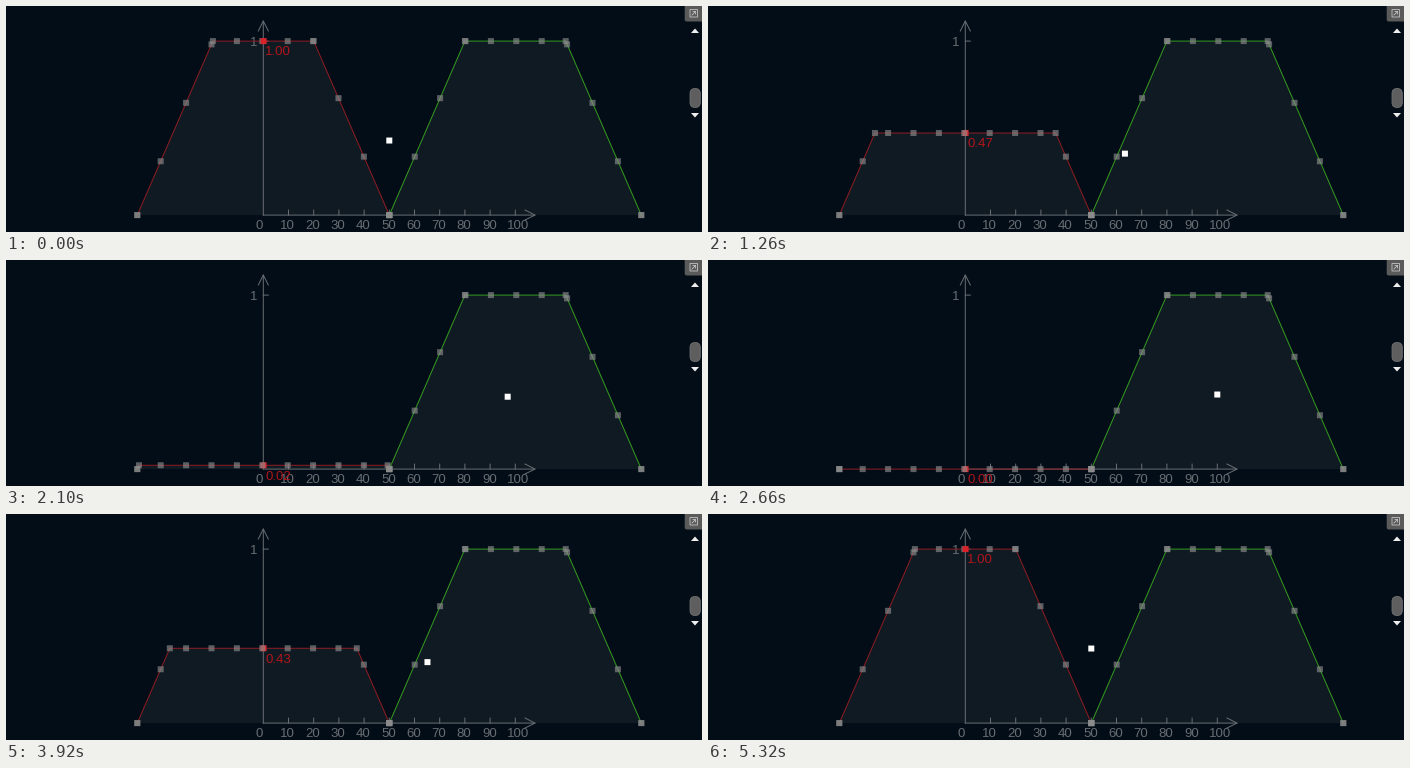
A matplotlib script that plays this animation: 696x226 px, repeating every 5.39 s.

```python
import numpy as np
import matplotlib.pyplot as plt
from matplotlib.animation import FuncAnimation
from matplotlib.collections import PolyCollection
from matplotlib.patches import FancyBboxPatch, Polygon, Rectangle

W, H, DPI = 696, 226, 64
FRAMES, STEP_MS = 77, 70
X0, Y0, UNIT, TALL = 257.3, 209.1, 2.52, 174
BG, FILL, GRAY = "#020d17", "#101a23", "#686d72"
RED, GREEN = "#8f1c22", "#349a20"
FONT = "Liberation Sans"
PT = 72 / DPI

plt.rcParams["toolbar"] = "None"
fig = plt.figure(figsize=(W / DPI, H / DPI), dpi=DPI, facecolor=BG)
ax = fig.add_axes([0, 0, 1, 1])
ax.set_xlim(0, W)
ax.set_ylim(H, 0)
ax.axis("off")


def px(u):
    return X0 + UNIT * np.asarray(u)


def py(v):
    return Y0 - TALL * np.asarray(v)


def line(xs, ys, color=GRAY, z=3, width=1):
    return ax.plot(xs, ys, color=color, lw=width * PT, zorder=z,
                   solid_joinstyle="miter", snap=False)[0]


def label(x, y, s, color=GRAY, z=4, ha="center"):
    return ax.text(x, y, s, color=color, family=FONT, size=13.2 * PT,
                   ha=ha, va="center_baseline", zorder=z)


def squares(color, z, alpha=1.0):
    return ax.add_collection(PolyCollection(
        [], facecolors=color, linewidths=0, alpha=alpha, zorder=z,
        snap=False), autolim=False)


def place(boxes, xs, ys, r=3):
    corners = r * np.array([(-1, -1), (1, -1), (1, 1), (-1, 1)])
    boxes.set_verts([corners + p for p in zip(xs, ys)])


def trapezoid(mid, v):
    """Corners of a fuzzy set around mid, clipped at height v."""
    half = 50 - 30 * v
    return (np.array([mid - 50, mid - half, mid + half, mid + 50]),
            np.array([0, v, v, 0]))


def handles(mid, v):
    us, vs = trapezoid(mid, v)
    side = 1 if mid > 50 else -1
    grid = 50 + side * 10.08 * np.arange(10)
    u = np.concatenate([grid, us, us[[0, 3]]])
    return px(u), py(np.interp(u, us, vs))


def area_and_height(v):
    top, base = 100 - 60 * v, 100
    return v * (top + base) / 2, v / 3 * (2 * top + base) / (top + base)


def centroid(v):
    a, h = area_and_height(v)
    b, g = area_and_height(1)
    return px(100 * b / (a + b)), py((a * h + b * g) / (a + b))


def level(i):
    keys = [1, 3, 6, 12, 23, 30, 32, 42, 47, 56, 74]
    vals = [1, .975, .895, .69, .29, .022, 0, 0, .147, .43, 1]
    return float(np.interp(i, keys, vals))


def draw_axes():
    line([X0, X0], [15, Y0])
    line([X0 - 5, X0, X0 + 5], [25, 15, 25])
    line([X0, 529], [Y0, Y0])
    line([519, 529, 519], [204, Y0, 214])
    line([X0, X0 + 5], [py(1)] * 2)
    label(247.3, 35, "1")
    label(253.3, 218.8, "0")
    for u in range(10, 101, 10):
        line([px(u)] * 2, [Y0 - 5, Y0])
        label(px(u) + (2.5 if u == 100 else -0.8), 218.8, str(u))


def draw_scrollbar():
    icon = "#c8c8c8"
    ax.add_patch(FancyBboxPatch(
        (680.7, -4), 20, 17.5, boxstyle="round,pad=2,rounding_size=2",
        fc="#5a5a5a", lw=0))
    ax.add_patch(Rectangle((684, 3.5), 7.5, 7.5, fill=False, ec=icon,
                           lw=.8 * PT, snap=False))
    line([686, 689.5], [9, 5.5], icon, width=.8)
    line([687, 689.5, 689.5], [5.5, 5.5, 8], icon, width=.8)
    ax.add_patch(FancyBboxPatch(
        (689, 87.5), .3, 9, boxstyle="round,pad=5,rounding_size=5",
        fc="#5e5e5e", ec="#727272", lw=.8 * PT))
    for base, tip in ((27, 22.5), (107, 111.5)):
        ax.add_patch(Polygon([(685, base), (693, base), (689, tip)],
                             fc="#eeeeee", lw=0))


draw_axes()
draw_scrollbar()

us, vs = trapezoid(100, 1)
ax.add_patch(Polygon(np.c_[px(us), py(vs)], fc=FILL, lw=0, zorder=1))
line(px(us), py(vs), GREEN, 5)
place(squares("#8c8c8c", 7, .65), *handles(100, 1))

area = ax.add_patch(Polygon([(0, 0)], fc=FILL, lw=0, zorder=1))
edge = line([], [], RED, 5)
knob = squares("#d8232b", 6)
dots = squares("#8c8c8c", 7, .65)
center = squares("#ffffff", 9)
value = label(259, 0, "", "#b0151b", 8, "left")


def update(i):
    v = level(i)
    us, vs = trapezoid(0, v)
    area.set_xy(np.c_[px(us), py(vs)])
    edge.set_data(px(us), py(vs))
    place(dots, *handles(0, v))
    place(knob, [X0 + .3], [py(v)])
    knob.set_zorder(8 if v >= 1 else 6)
    x, y = centroid(v)
    place(center, [x], [y])
    value.set_text(f"{v:.2f}")
    value.set_y(py(v) + 9.8)
    return area, edge, dots, knob, center, value


anim = FuncAnimation(fig, update, frames=FRAMES, interval=STEP_MS,
                     init_func=lambda: update(0), repeat=True,
                     repeat_delay=0, blit=False)
plt.show()
```
